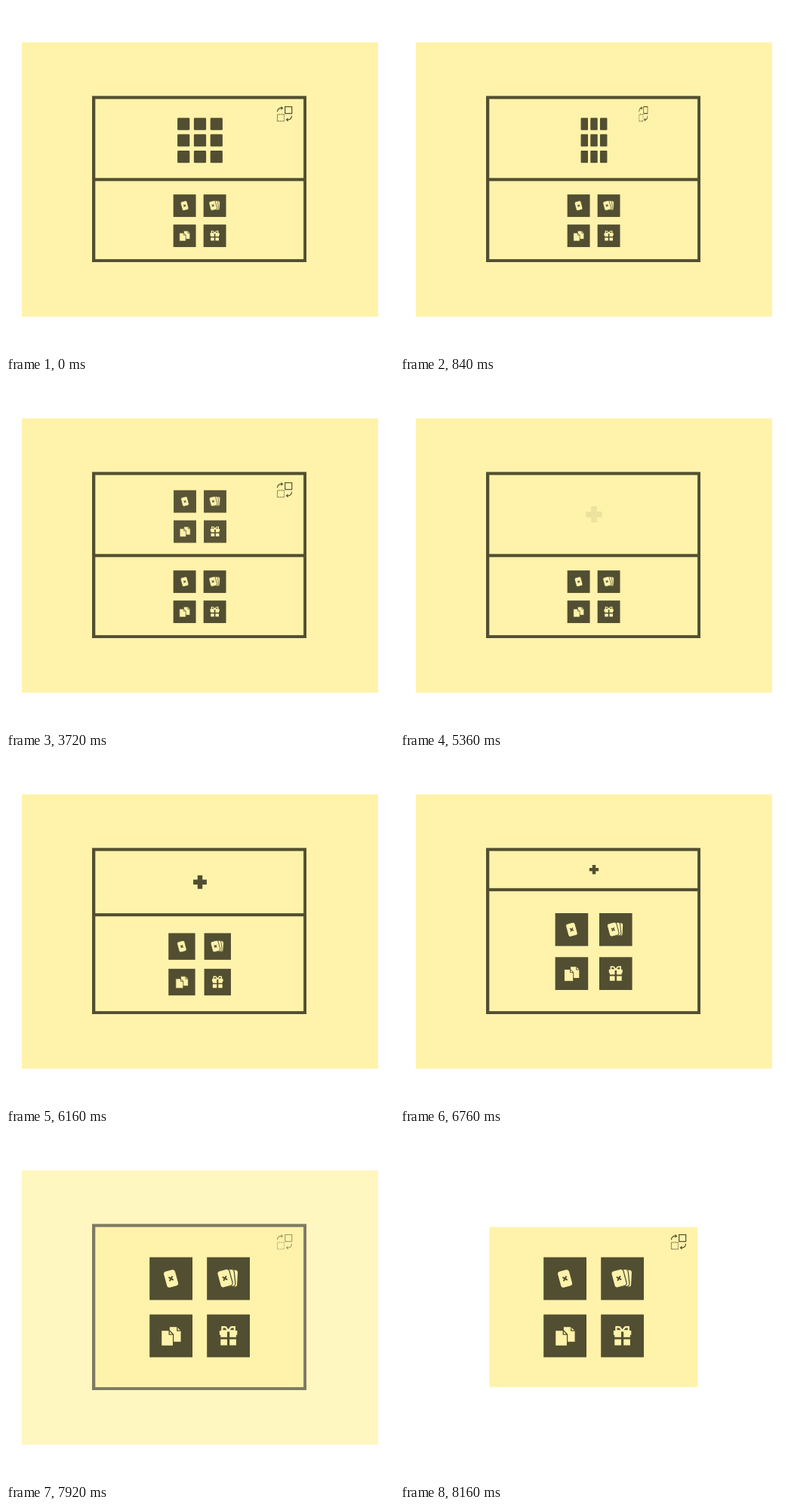
Recreate the animation shown at these times as an HTML page. Size 514 by 462 pixels, loop 8.24 s.

```html
<!DOCTYPE html>
<html lang="en">
<head>
<meta charset="utf-8">
<title>Panel switch</title>
<style>
  html, body { margin: 0; width: 100%; height: 100%; overflow: hidden; background: #fff; }
  svg { display: block; width: 514px; height: 462px; }
  .dark { fill: #524e31; }
  .pale { fill: #fff3ab; }
  .line { fill: none; stroke: #524e31; }
  .cut { stroke: #524e31; stroke-width: 1.3; }
</style>
</head>
<body>
<svg viewBox="0 0 514 462" xmlns="http://www.w3.org/2000/svg">
  <defs>
    <rect id="card" class="pale cut" x="-8.3" y="-11.6" width="16.6" height="23.2" rx="4"/>
    <g id="front">
      <use href="#card"/>
      <path class="line" stroke-width="2" d="M-2.6-2.6 2.6 2.6M2.6-2.6-2.6 2.6"/>
    </g>
    <g id="doc">
      <path class="pale cut" d="M-8-10.3H2.8L8-5V10.3H-8Z"/>
      <path class="line" stroke-width="1.3" d="M2.6-10.3V-4.8H8"/>
    </g>
    <rect id="tile" class="dark" x="-28.4" y="-28.4" width="56.8" height="56.8"/>

    <!-- 2 x 2 menu, 133 units wide, centred on 0,0 -->
    <g id="menu">
      <g transform="translate(-38 -38)">
        <use href="#tile"/>
        <use href="#front" transform="rotate(-15)"/>
      </g>
      <g transform="translate(38 -38)">
        <use href="#tile"/>
        <use href="#card" transform="translate(4.3 -.6) rotate(3)"/>
        <use href="#card" transform="translate(.2 -.6) rotate(-6)"/>
        <use href="#front" transform="translate(-4.6 -.4) rotate(-15)"/>
      </g>
      <g transform="translate(-38 38)">
        <use href="#tile"/>
        <use href="#doc" transform="translate(5.6 -2)"/>
        <use href="#doc" transform="translate(-5 3)"/>
      </g>
      <g transform="translate(38 38)">
        <use href="#tile"/>
        <path class="pale" d="M-11.7-7H-1.6V-1.2H-11.7ZM1.6-7H11.7V-1.2H1.6ZM-10.3-1.5H-1.6V1.8H-10.3ZM1.6-1.5H10.3V1.8H1.6ZM-10.3 4.4H-1.6V12.4H-10.3ZM1.6 4.4H10.3V12.4H1.6Z"/>
        <path d="M0-6.6-3.5-11.6-8.3-11.8-8.2-6.8ZM0-6.6 3.5-11.6 8.3-11.8 8.2-6.8Z" fill="#524e31" stroke="#fff3ab" stroke-width="2.2" stroke-linejoin="round"/>
      </g>
    </g>

    <g id="swap">
      <g class="line" stroke-width="1.2">
        <rect x=".7" y="-9.4" width="9" height="9"/>
        <rect x="-9.5" y=".8" width="9" height="9" stroke-dasharray="1.2 1.05"/>
        <path d="M-9.5-2.6C-9.5-6-7.5-7.7-3.8-7.7M9.5 2.6C9.5 6 7.5 7.9 3.8 7.9"/>
      </g>
      <path class="dark" d="M-4.6-10.2-1.6-7.7-4.6-5.2ZM4.6 5.4 1.6 7.9 4.6 10.4Z"/>
    </g>
  </defs>

  <g id="outer">
    <rect class="pale" x="21" y="48.3" width="472" height="364.2"/>
    <rect class="dark" x="114" y="119.4" width="284" height="220.6"/>
  </g>
  <rect class="pale" x="118.3" y="123.5" width="275.8" height="212.6"/>
  <rect id="divider" class="dark" x="116" width="280" height="4.1"/>
  <path id="plus" class="dark" d="M-.18-.5H.18V-.18H.5V.18H.18V.5H-.18V.18H-.5V-.18H-.18Z"/>
  <use id="lower" href="#menu"/>
  <g id="top">
    <g id="grid"></g>
    <use id="upper" href="#menu" transform="translate(0 .2) scale(.526)"/>
    <use href="#swap" transform="translate(112 -35.3)"/>
  </g>
  <circle id="ripple" class="dark" cx="369" cy="143"/>
</svg>

<script>
const LOOP = 8240, STEP = 40;
const $ = id => document.getElementById(id);
const set = (id, attrs) => {
  for (const k in attrs) $(id).setAttribute(k, attrs[k]);
};
const ramp = (t, a, b) => Math.min(1, Math.max(0, (t - a) / (b - a)));
const mix = (a, b, p) => a + (b - a) * p;

for (let i = 0; i < 9; i++) {
  const cell = document.createElementNS("http://www.w3.org/2000/svg", "rect");
  const at = { x: (i % 3) * 21.8 - 29.9, y: Math.floor(i / 3) * 21.8 - 29.9, width: 16.2, height: 16.2, rx: 1.3, class: "dark" };
  for (const k in at) cell.setAttribute(k, at[k]);
  $("grid").appendChild(cell);
}

function draw(t) {
  // tap on the swap icon
  const tap = ramp(t, 0, 400);
  set("ripple", { r: 20 * Math.min(1, tap * 1.6), opacity: 0.35 * (1 - tap) });

  // upper pane: flip, fade out, swap icon returns at the end
  const flip = Math.abs(ramp(t, 640, 1600) * 2 - 1);
  const ending = t >= 7720;
  const showMenu = t >= 1120;
  set("top", {
    transform: `translate(257 178.4) scale(${Math.max(flip, 0.001)} 1)`,
    opacity: ending ? ramp(t, 7720, 8120) : 1 - ramp(t, 3680, 4640)
  });
  set("grid", { display: showMenu ? "none" : "inline" });
  set("upper", { display: showMenu && !ending ? "inline" : "none" });

  // lower pane grows
  const p = ramp(t, 5760, 7720);
  const mid = mix(230.4, 121.5, p);
  set("divider", { y: mid - 2.05, display: p < 1 ? "inline" : "none" });
  set("lower", { transform: `translate(256.6 ${mix(285.1, 230, p)}) scale(${mix(0.526, 1, p)})` });
  set("plus", {
    transform: `translate(257 ${mix(175.8, 121.5, p)}) scale(${mix(21.5, 3.5, p)})`,
    opacity: ramp(t, 5320, 5720) * (1 - ramp(t, 7120, 7440))
  });

  set("outer", { opacity: 1 - ramp(t, 7840, 8160) });
}

let start;
function tick(now) {
  if (start === undefined) start = now;
  const t = (now - start) % LOOP;
  draw(Math.min(8160, Math.floor(t / STEP) * STEP));
  requestAnimationFrame(tick);
}
draw(0);
requestAnimationFrame(tick);
</script>
</body>
</html>
```
